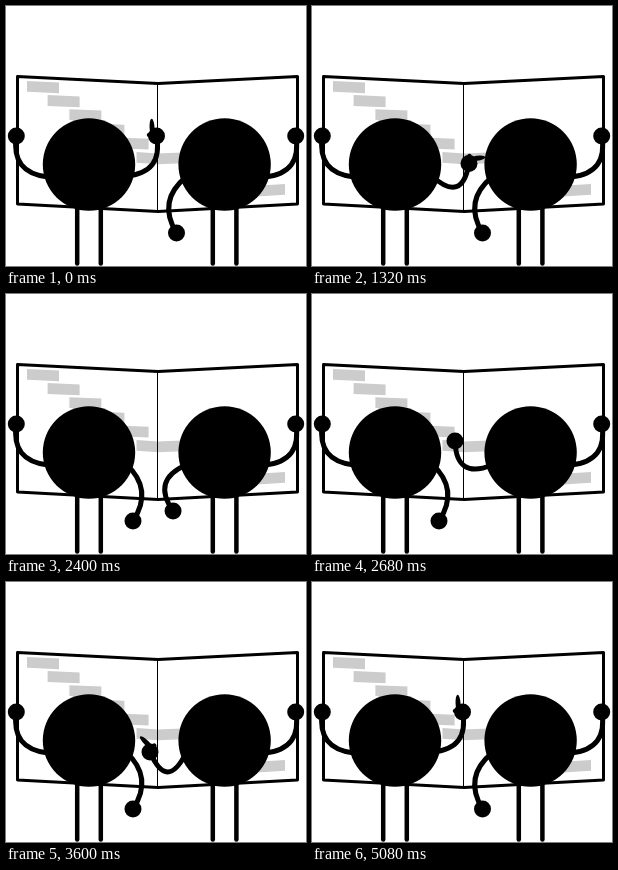
Recreate the animation shown at these times as an HTML page with a canvas. Size 300 px wide and 260 px high, loop 5120 ms.

```html
<!DOCTYPE html>
<html lang="en">
<head>
<meta charset="utf-8">
<title>Reading the map</title>
<style>
  html, body { margin: 0; width: 100%; height: 100%; overflow: hidden; background: #fff; }
  canvas { display: block; }
</style>
</head>
<body>
<canvas id="stage" width="300" height="260"></canvas>
<script>
const ctx = document.getElementById('stage').getContext('2d');
const LOOP = 5120, STEP = 40;

const pose = (x, y, angle = 0, finger = 0) => ({ x, y, angle, finger });
const move = (from, to, goal) => ({ from, to, goal });

// side: which way the elbow bends; level: height where the bend flips.
const leftArm = {
  x: 120, y: 170, side: 1, level: 177,
  moves: [
    move(400, 960, pose(157, 154, -8, 17)),
    move(1520, 1760, pose(134.5, 177, 40, 14)),
    move(1760, 2040, pose(127, 227, 60)),
    move(4760, 5080, pose(150.5, 130, -93, 17.5))
  ],
  taps: [[0, 400], [1280, 1520]]
};

const rightArm = {
  x: 180, y: 171, side: -1, level: 188,
  moves: [
    move(2360, 2680, pose(143, 147, -139)),
    move(2680, 3080, pose(121, 126.5, -139, 18)),
    move(3240, 3600, pose(144, 170, -135, 18)),
    move(3800, 4080, pose(160, 156, -135)),
    move(4200, 4480, pose(170.5, 227, -139))
  ],
  taps: []
};

const clamp = (v, lo, hi) => Math.min(hi, Math.max(lo, v));
const mix = (a, b, k) => a + (b - a) * k;

function handAt({ moves, taps }, t) {
  let { x, y, angle, finger } = moves[moves.length - 1].goal;
  for (const { from, to, goal } of moves) {
    if (t < from) break;
    const k = clamp((t - from) / (to - from), 0, 1);
    x = mix(x, goal.x, k);
    y = mix(y, goal.y, k);
    finger = mix(finger, goal.finger, k);
    angle = mix(angle, goal.angle, k ** 4);
  }
  for (const [from, to] of taps) {
    if (t > from && t < to) y += 4 * Math.sin((t - from) / (to - from) * Math.PI * 2);
  }
  return { x, y, angle, finger };
}

function line(width, ...pts) {
  ctx.beginPath();
  pts.forEach(p => ctx.lineTo(...p));
  ctx.lineWidth = width;
  ctx.stroke();
}

function disc(x, y, r) {
  ctx.beginPath();
  ctx.arc(x, y, r, 0, Math.PI * 2);
  ctx.fill();
}

function brick(x, y, w, slope) {
  ctx.beginPath();
  ctx.moveTo(x, y);
  ctx.lineTo(x + w, y + slope);
  ctx.lineTo(x + w, y + slope + 10.8);
  ctx.lineTo(x, y + 10.8);
  ctx.fill();
}

// The nearer the hand is to the shoulder, the more the arm bends.
function arm({ x, y, side, level = 177 }, hand) {
  const dx = hand.x - x, dy = hand.y - y, d = Math.hypot(dx, dy);
  const bend = side * Math.min(46, 1400 / d) * clamp((level - hand.y) / 12, -1, 1);
  ctx.beginPath();
  ctx.moveTo(x, y);
  ctx.quadraticCurveTo(x + dx / 2 - dy / d * bend, y + dy / 2 + dx / d * bend, hand.x, hand.y);
  ctx.lineWidth = 5;
  ctx.stroke();
  disc(hand.x, hand.y, 8.5);
}

function finger(side, { x, y, angle, finger: size }) {
  if (size < 1) return;
  ctx.save();
  ctx.translate(x, y);
  ctx.rotate(angle * Math.PI / 180);
  ctx.beginPath();
  ctx.ellipse(size / 2, -4 * side, size / 2, 2.5, 0, 0, Math.PI * 2);
  ctx.fill();
  disc(1.5, -7.5 * side, size / 8);
  ctx.restore();
}

function movingArm(limb, t) {
  const hand = handAt(limb, t);
  arm(limb, hand);
  finger(limb.side, hand);
}

function drawMap() {
  ctx.fillStyle = '#ccc';
  for (let i = 0; i < 5; i++) brick(21 + 20 * i + 0.6 * i * i, 75 + 14.1 * i, 32, 1.4);
  brick(130.5, 146, 21.5, 1.5);
  brick(152, 147.5, 24, -1);
  brick(247, 180, 32, -2);
  line(1, [151.5, 77.5], [151.5, 205.5]);
  line(3, [152, 77.5], [11.5, 70.5], [11.5, 198], [152, 205.5],
    [291.5, 198], [291.5, 70.5], [152, 77.5]);
}

function body(x) {
  for (const leg of [x - 11.8, x + 11.8]) line(4.5, [leg, 195], [leg, 257.5]);
  disc(x, 158.5, 46.2);
}

function draw(t) {
  ctx.fillStyle = '#fff';
  ctx.fillRect(0, 0, 300, 260);
  ctx.strokeStyle = '#000';
  ctx.lineCap = ctx.lineJoin = 'round';
  drawMap();
  ctx.fillStyle = '#000';
  body(83);
  body(218.6);
  arm({ x: 42, y: 171, side: -1 }, pose(10.3, 130));
  arm({ x: 259, y: 171, side: 1 }, pose(289.7, 130));
  movingArm(leftArm, t);
  movingArm(rightArm, t);
}

function tick() {
  const t = performance.now() % LOOP;
  draw(Math.floor(t / STEP) * STEP);
  requestAnimationFrame(tick);
}
tick();
</script>
</body>
</html>
```
